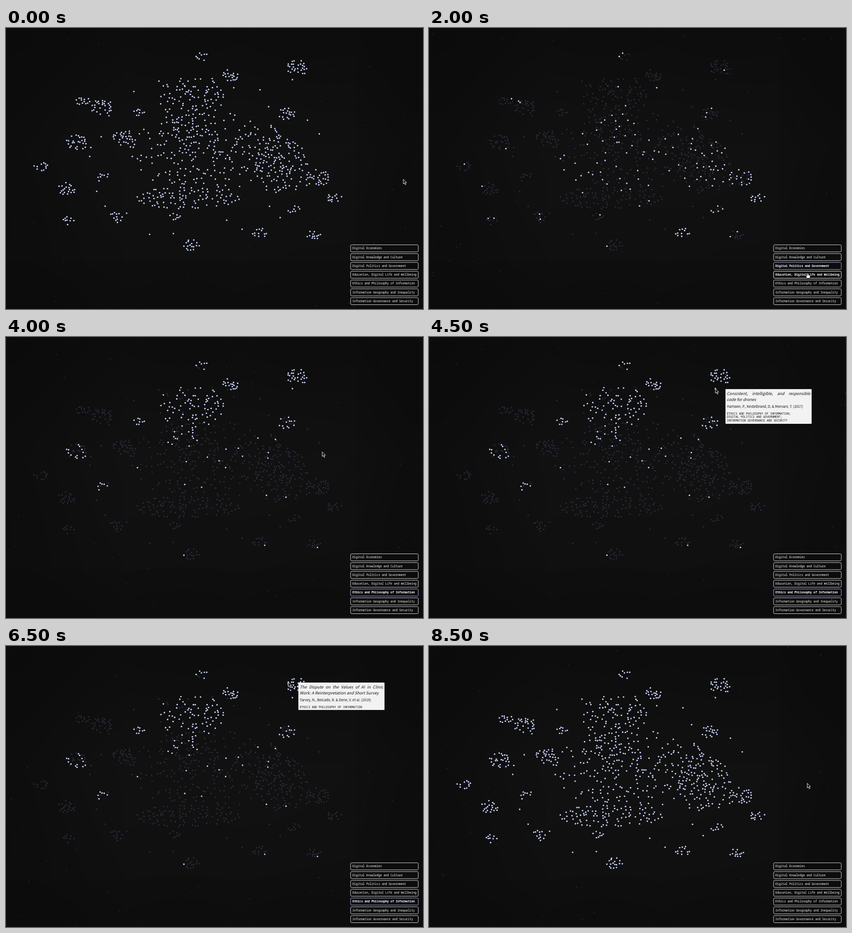
An HTML page with a canvas for the animation above (9 s loop, 910 by 615 pixels).

```html
<!DOCTYPE html>
<html lang="en">
<head>
<meta charset="utf-8">
<title>Research map</title>
<style>
html, body { margin: 0; width: 100%; height: 100%; overflow: hidden; background: #0a0a0a; }
#stage {
  position: relative; width: 910px; height: 615px; overflow: hidden;
  background: #121212; box-shadow: inset 0 0 300px 50px #090909;
}
#stage > * { position: absolute; }
#menu, canvas { left: 0; top: 0; }
#menu text, .tags { font: 500 6.3px "Noto Sans Mono", "DejaVu Sans Mono", monospace; white-space: pre; }
#menu text { fill: #fff; }
#menu rect { fill: none; stroke: #d8d8d8; }
.hover text, .picked text { font-weight: 700 !important; }
#menu .hover rect { stroke: #fff; }
#menu .picked rect { stroke: #a5b0ec; }
#card {
  width: 188px; box-sizing: border-box; padding: 4px 3px 3px; border-radius: 1px;
  background: #f2f2f2; color: #111; font-family: "Noto Sans CJK SC", "Noto Sans CJK JP", "Open Sans", sans-serif;
}
.title { font-size: 8.75px; line-height: 12.6px; font-style: italic; white-space: nowrap; }
.title:first-child { text-align-last: justify; white-space: normal; height: 12.6px; }
.authors { font-size: 7.5px; line-height: 12px; margin: 3px 0 5.5px; white-space: nowrap; }
#card .tags { line-height: 7.8px; }
#cursor { overflow: visible; left: 0; top: 0; }
</style>
</head>
<body>
<div id="stage">
  <svg id="menu" width="910" height="615"></svg>
  <canvas width="910" height="615"></canvas>
  <div id="card"></div>
  <svg id="cursor" width="12" height="16" stroke-linejoin="round">
    <path id="arrow" d="M0 0V10L2.3 8L4 12L5.8 11.2L4.1 7.4H7.2Z" fill="#111" stroke="#fff" stroke-width=".9"/>
    <path id="hand" d="M-1 .6Q0-.6 1 .6L1.5 4L5 4.8Q6.5 5.2 6.2 7L5.2 11H-.2L-3 7.2Q-3.4 5.6-1.8 6L-.5 7Z" fill="#fff" stroke="#222" stroke-width=".7"/>
  </svg>
</div>
<script>
const STEP = 500, LOOP = 9000;
const POLITICS = 2, ETHICS = 4;
const ROW = 19.27, MENU_LEFT = 752, MENU_TOP = 474.5;
const topics = [
  "Digital Economies", "Digital Knowledge and Culture", "Digital Politics and Government",
  "Education, Digital Life and Wellbeing", "Ethics and Philosophy of Information",
  "Information Geography and Inequality", "Information Governance and Security"
];
const papers = [
  { at: [625, 113], title: ["Consistent, intelligible, and responsible", "code for drones"],
    authors: "Hartwen, P., Kestelbrand, D. & Morvani, T. (2017)",
    tags: "ETHICS AND PHILOSOPHY OF INFORMATION;\nDIGITAL POLITICS AND GOVERNMENT;\nINFORMATION GOVERNANCE AND SECURITY" },
  { at: [616, 94.5], title: ["Converting Guidelines into Procedures of", "Digital Virtue: Four Traps of Being Uncaring"],
    authors: "Morvani, T. (2019)", tags: "ETHICS AND PHILOSOPHY OF INFORMATION" },
  { at: [616, 79], title: ["The Dispute on the Values of AI in Clinic", "Work: A Reinterpretation and Short Survey"],
    authors: "Tarvey, N., Belcado, R. & Denn, V. et al. (2019)", tags: "ETHICS AND PHILOSOPHY OF INFORMATION" }
];
const FIRST_PAPER = 9, STEPS_PER_PAPER = 2;
const paperEnd = FIRST_PAPER + papers.length * STEPS_PER_PAPER;

// Pointer stops outside the papers: step, x, y
const approach = [[0, 867, 331], [3, 827, 517], [5, 824, 556], [6, 820, 528]];
const leave = [17, 825.5, 300.5];
const stops = [
  ...approach,
  ...papers.flatMap(({ at }, i) => {
    const arrive = FIRST_PAPER + i * STEPS_PER_PAPER;
    return [[arrive, ...at], [arrive + STEPS_PER_PAPER - 1, ...at]];
  }),
  leave
];

function seeded(seed) {
  return () => {
    seed = (seed + 0x6D2B79F5) | 0;
    let t = Math.imul(seed ^ (seed >>> 15), 1 | seed);
    t = (t + Math.imul(t ^ (t >>> 7), 61 | t)) ^ t;
    return ((t ^ (t >>> 14)) >>> 0) / 4294967296;
  };
}

// Share of dots belonging to each topic, by kind of area
const odds = {
  ethics: { [ETHICS]: .88, [POLITICS]: .03 },
  mixed: { [ETHICS]: .5, [POLITICS]: .15 },
  politics: { [ETHICS]: .03, [POLITICS]: .75 },
  core: { [ETHICS]: .05, [POLITICS]: .22 },
  quiet: { [ETHICS]: .01, [POLITICS]: .05 }
};
// Islands around the core: x, y, number of dots
const islands = {
  ethics: [[428, 63, 8], [488, 103, 18], [637, 87, 25], [292, 183, 9], [209, 327, 7]],
  mixed: [[155, 250, 26], [614, 187, 19]],
  politics: [[680, 328, 30], [716, 370, 13], [628, 397, 8], [553, 448, 12]],
  quiet: [[167, 160, 13], [207, 174, 26], [258, 240, 27], [76, 304, 11], [131, 352, 20],
    [135, 421, 9], [239, 415, 12], [368, 414, 8], [672, 454, 13], [406, 475, 16]]
};
const dots = [];
const random = seeded(23);

function addDot(x, y, share) {
  dots.push({ x, y, [ETHICS]: random() < share[ETHICS], [POLITICS]: random() < share[POLITICS] });
}

function scatter(cx, cy, rx, ry, count, kind, bias = .5) {
  for (let i = 0; i < count; i++) {
    let x, y, tries = 0;
    do {
      const angle = random() * 2 * Math.PI, reach = random() ** bias;
      x = cx + rx * reach * Math.cos(angle);
      y = cy + ry * reach * Math.sin(angle);
    } while (++tries < 20 && dots.some(d => Math.hypot(d.x - x, d.y - y) < 3.6));
    addDot(x, y, odds[kind]);
  }
}

for (const { at } of papers) addDot(...at, { [ETHICS]: 1, [POLITICS]: 0 });
for (const kind in islands) {
  for (const [x, y, count] of islands[kind]) {
    const size = 4.7 * Math.sqrt(count);
    scatter(x, y, size, size * .7, count, kind);
  }
}
scatter(445, 270, 175, 90, 255, "core", .62);
scatter(600, 300, 58, 66, 90, "core");
scatter(405, 152, 74, 46, 85, "ethics");
scatter(388, 228, 42, 36, 30, "mixed");
scatter(395, 372, 115, 24, 90, "quiet");

// Stray dots on a wide ring
for (let i = 0; i < 30; i++) {
  const angle = (i + random()) / 30 * 2 * Math.PI, reach = .85 + .3 * random();
  addDot(425 + 240 * reach * Math.cos(angle), 280 + 165 * reach * Math.sin(angle), odds.quiet);
}

const stage = document.getElementById("stage");
const pen = stage.querySelector("canvas").getContext("2d");
const menu = document.getElementById("menu");
const card = document.getElementById("card");
const cursor = document.getElementById("cursor");
const arrow = document.getElementById("arrow");
const hand = document.getElementById("hand");

function addShape(parent, tag, attributes) {
  const shape = document.createElementNS("http://www.w3.org/2000/svg", tag);
  for (const name in attributes) shape.setAttribute(name, attributes[name]);
  parent.append(shape);
  return shape;
}

const buttons = topics.map((name, i) => {
  const y = MENU_TOP + i * ROW;
  const button = addShape(menu, "g");
  addShape(button, "rect", { x: MENU_LEFT, y, width: 147.7, height: 15.4, rx: 2.3 });
  addShape(button, "text", { x: 756, y: y + 9.9 }).textContent = name;
  return button;
});

function disc(x, y, radius, color) {
  pen.fillStyle = color;
  pen.beginPath();
  pen.arc(x, y, radius, 0, 2 * Math.PI);
  pen.fill();
}

function drawStars(step) {
  const next = seeded(900 + step * 71);
  for (let i = 0; i < 62; i++) {
    const x = next() * 910, y = next() * 615;
    const distance = Math.hypot((x - 455) / 455, (y - 307) / 307);
    disc(x, y, .75, `rgba(190,190,190,${Math.min(.42, distance * .35 * (.5 + next()))})`);
  }
}

function addLine(className, text) {
  const line = document.createElement("div");
  line.className = className;
  line.textContent = text;
  card.append(line);
}

function showCard(paper) {
  card.style.display = paper ? "block" : "none";
  if (!paper) return;
  card.replaceChildren();
  paper.title.forEach(text => addLine("title", text));
  addLine("authors", paper.authors);
  addLine("tags", paper.tags);
  card.style.left = Math.round(paper.at[0] + 22) + "px";
  card.style.top = Math.round(paper.at[1] + 1) + "px";
}

function pointerAt(step) {
  const after = Math.max(1, stops.findIndex(([when]) => when >= step));
  const [from, x0, y0] = stops[after - 1], [to, x1, y1] = stops[after];
  const part = (step - from) / (to - from);
  return [x0 + (x1 - x0) * part, y0 + (y1 - y0) * part];
}

function pickedAt(step) {
  if (step < 3 || step >= leave[0]) return -1;
  return step < 5 ? POLITICS : ETHICS;
}

function show(step) {
  const [x, y] = pointerAt(step);
  const picked = pickedAt(step);
  const hovered = x > MENU_LEFT ? Math.floor((y + 7 - MENU_TOP) / ROW) : -1;
  const lit = dot => picked < 0 || dot[picked];

  pen.clearRect(0, 0, 910, 615);
  drawStars(step);
  for (const dot of dots) if (!lit(dot)) disc(dot.x, dot.y, 1.7, "rgba(120,120,190,.25)");
  for (const dot of dots) if (lit(dot)) disc(dot.x, dot.y, 1.7, "#c9d3fb");

  buttons.forEach((button, i) => {
    button.classList.toggle("picked", i === picked);
    button.classList.toggle("hover", i === hovered);
  });
  showCard(step < paperEnd ? papers[Math.floor((step - FIRST_PAPER) / STEPS_PER_PAPER)] : null);
  cursor.style.transform = `translate(${x}px, ${y}px)`;
  arrow.style.display = hovered < 0 ? "" : "none";
  hand.style.display = hovered < 0 ? "none" : "";
}

const start = performance.now();
let shown = -1;
function tick() {
  const step = Math.floor((performance.now() - start) % LOOP / STEP);
  if (step !== shown) show(shown = step);
  requestAnimationFrame(tick);
}
tick();
</script>
</body>
</html>
```
